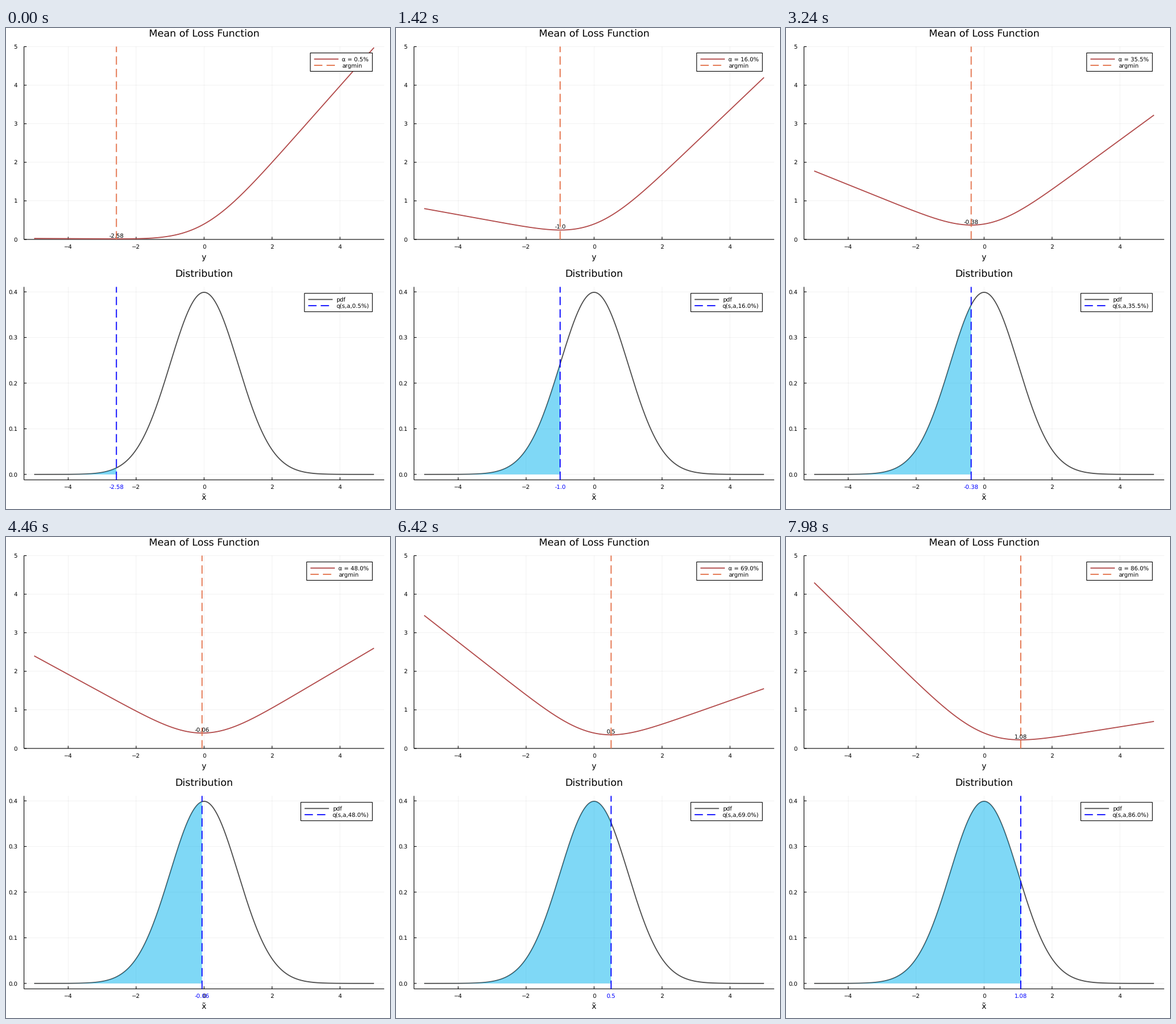
Animation of 669 by 837 pixels, one loop 8000 ms. Source, as a matplotlib script:

```python
import math

import matplotlib.pyplot as plt
import numpy as np
from matplotlib.animation import FuncAnimation
from matplotlib.collections import LineCollection
from matplotlib.patches import Polygon, Rectangle

W, H, DPI = 669, 837, 64
PT = 72 / DPI  # points per pixel

plt.rcParams["font.family"] = "DejaVu Sans"
plt.rcParams["text.hinting"] = "none"

# Layout in pixels, y pointing down
MID, UNIT = 345.1, 59.2
LEFT, RIGHT = MID - 5.3 * UNIT, MID + 5.3 * UNIT
TOP1, BASE1, SCALE1 = 32.3, 367.9, 67.1
TOP2, BASE2, ZERO2, SCALE2 = 450.5, 786.3, 776.8, 794.2
LINE = 1.81
SMALL, LABEL, TITLE = 10, 13.75, 17.4
DIGIT = 6.36

BROWN = (178 / 255, 74 / 255, 74 / 255)
CORAL = (0.889, 0.436, 0.278)
SKY = "#00b2ee"
GREY = (0.3, 0.3, 0.3)


def px(x):
    return MID + UNIT * x


def py1(y):
    return BASE1 - SCALE1 * y


def py2(y):
    return ZERO2 - SCALE2 * y


fig = plt.figure(figsize=(W / DPI, H / DPI), dpi=DPI, facecolor="white")
ax = fig.add_axes([0, 0, 1, 1])
ax.set_xlim(0, W)
ax.set_ylim(H, 0)
ax.axis("off")


def text(x, y, s, size=SMALL, ha="center", color="black", z=6):
    return ax.text(x, y, s, fontsize=size * PT, ha=ha, va="baseline",
                   color=color, zorder=z)


def line(xs, ys, color, z, dashed=False):
    style = (0, (8, 4)) if dashed else "-"
    (item,) = ax.plot(xs, ys, color=color, lw=LINE * PT, ls=style, zorder=z,
                      solid_capstyle="butt", dash_capstyle="butt", snap=False)
    return item


def segments(segs, width, z, alpha=1):
    ax.add_collection(LineCollection(segs, colors="black", alpha=alpha,
                                     linewidths=width * PT, zorder=z,
                                     snap=False))


def panel(top, base, title, xlabel, ticks, to_y, fmt):
    xs = [px(v) for v in (-4, -2, 0, 2, 4)]
    ys = [to_y(v) for v in ticks]
    segments([[(x, top), (x, base)] for x in xs]
             + [[(LEFT, y), (RIGHT, y)] for y in ys], 0.5, 1, 0.1)
    segments([[(LEFT, base), (RIGHT, base)], [(LEFT, top), (LEFT, base)]]
             + [[(x, base), (x, base - 4.5)] for x in xs]
             + [[(LEFT, y), (LEFT + 4.5, y)] for y in ys], 1.1, 2)
    for x, v in zip(xs, (-4, -2, 0, 2, 4)):
        text(x, base + 15.9, str(v).replace("-", "\u2212"))
    for y, v in zip(ys, ticks):
        text(20, y + 3.65, fmt.format(v), ha="right")
    text(MID, top - 16.7, title, TITLE)
    text(MID, base + 34.8, xlabel, LABEL)


class Legend:
    """Two-row legend whose left side follows the width of its text."""

    def __init__(self, top, colors, labels):
        self.box = ax.add_patch(Rectangle((0, top), 1, 32, fc="white",
                                          ec="black", lw=1.1 * PT, zorder=8,
                                          snap=False))
        rows = (top + 10.7, top + 21.5)
        self.keys = [line([0, 1], [y, y], c, 9, dashed=d)
                     for y, c, d in zip(rows, colors, (False, True))]
        self.texts = [text(0, y + 3.7, s, ha="left", z=9)
                      for y, s in zip(rows, labels)]

    def place(self, x):
        self.box.set_x(x - 55.2)
        self.box.set_width(638.3 - (x - 55.2))
        for key in self.keys:
            key.set_xdata([x - 48.6, x - 6.1])
        for t in self.texts:
            t.set_x(x)


grid = np.arange(-250, 251) / 50
pdf = np.exp(-grid ** 2 / 2) / math.sqrt(2 * math.pi)
cdf = np.array([0.5 * (1 + math.erf(v / math.sqrt(2))) for v in grid])

panel(TOP1, BASE1, "Mean of Loss Function", "y", range(6), py1, "{}")
panel(TOP2, BASE2, "Distribution", "x\u0303", [0, 0.1, 0.2, 0.3, 0.4],
      py2, "{:.1f}")

loss_line = line(px(grid), py1(pdf), BROWN, 4)
argmin_line = line([0, 0], [BASE1, TOP1], CORAL, 5, dashed=True)
argmin_text = text(0, 0, "", z=7)

line(px(grid), py2(pdf), GREY, 3)
area = ax.add_patch(Polygon([(0, 0), (1, 0), (1, 1)], closed=True, fc=SKY,
                            ec="none", lw=0, alpha=0.5, zorder=4))
quantile_line = line([0, 0], [BASE2, TOP2], "blue", 5, dashed=True)
quantile_text = text(0, BASE2 + 15.9, "", color="blue", z=7)

loss_legend = Legend(43.4, (BROWN, CORAL), ("", "argmin"))
pdf_legend = Legend(461.7, (GREY, "blue"), ("pdf", ""))


def step_of(tick):
    # Steps last 20, 100 and 20 ms in turn
    group, rest = divmod(tick, 7)
    return 3 * group + (rest > 0) + (rest > 5)


def update(tick):
    alpha = 0.005 * (step_of(tick) + 1)
    loss = pdf + grid * cdf - alpha * grid
    i = int(np.argmin(loss))
    q = grid[i]
    x = px(q)
    label = str(round(float(q), 2))

    loss_line.set_ydata(py1(loss))
    argmin_line.set_xdata([x, x])
    argmin_text.set_position((x, py1(loss[i]) - 2.4))
    argmin_text.set_text(label)

    quantile_line.set_xdata([x, x])
    quantile_text.set_x(x)
    quantile_text.set_text(label)
    curve = np.column_stack([px(grid[:i + 1]), py2(pdf[:i + 1])])
    area.set_xy(np.vstack([curve, [(x, ZERO2), (px(-5), ZERO2)]]))

    percent = f"{100 * alpha:.1f}%"
    shift = DIGIT * (5 - len(percent))
    loss_legend.texts[0].set_text(f"\u03b1 = {percent}")
    pdf_legend.texts[1].set_text(f"q(s,a,{percent})")
    loss_legend.place(579.0 + shift)
    pdf_legend.place(568.8 + shift)
    return []


anim = FuncAnimation(fig, update, frames=400, interval=20, repeat=True,
                     repeat_delay=0, init_func=lambda: update(0), blit=False)
plt.show()
```
